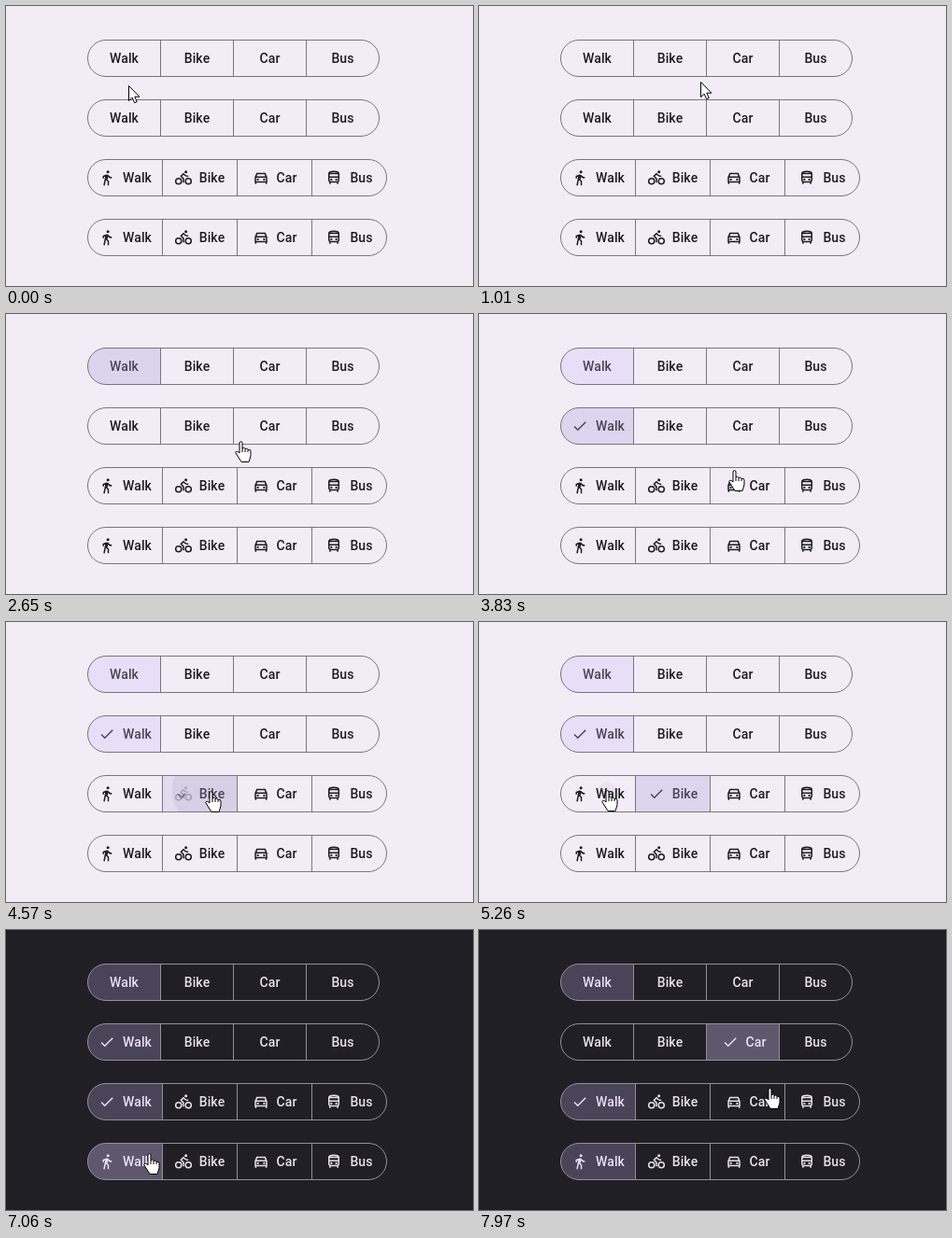
An HTML page with a canvas that plays this animation: 500 by 300 pixels, repeating every 8 s.

```html
<!DOCTYPE html>
<html lang="en">
<head>
<meta charset="utf-8">
<title>Segmented buttons</title>
<style>
html, body { margin: 0; width: 100%; height: 100%; overflow: hidden; background: #f2ecf7; }
canvas { display: block; width: 500px; height: 300px; }
</style>
</head>
<body>
<canvas id="stage"></canvas>
<script>
const LOOP = 8000, DARK_AT = 7000;
const canvas = document.getElementById('stage');
const ctx = canvas.getContext('2d');
const ratio = window.devicePixelRatio || 1;
canvas.width = 500 * ratio;
canvas.height = 300 * ratio;

const LIGHT = { bg: '#f2ecf7', line: '#79747e', text: '#1d1b20', on: '#4a4458', fill: '#e8def8', focus: '#ddd5ee', ripple: '29,27,32' };
const DARK = { bg: '#211f26', line: '#938f99', text: '#e6e0e9', on: '#e8def8', fill: '#4a4458', focus: '#5a5468', ripple: '230,224,233' };

const LABELS = ['Walk', 'Bike', 'Car', 'Bus'];
const LEFT = 87, HEIGHT = 40, ICON = 18, LEAD = 26;
const ROWS = [0, 1, 2, 3].map(i => ({
  y: 36 + 64 * i,
  cell: i < 2 ? 78 : 80,
  icon: i > 1,
  check: i === 1 || i === 2
}));

// Each click is reached through one point of a curve
const CLICKS = [
  { at: 1300, row: 0, col: 2, via: { t: 940, x: 215, y: 88 } },
  { at: 2290, row: 0, col: 0, via: { t: 1930, x: 205, y: 170 } },
  { at: 3250, row: 1, col: 0, via: { t: 2650, x: 251, y: 136 } },
  { at: 4480, row: 2, col: 1, via: { t: 4000, x: 306, y: 183 } },
  { at: 5320, row: 2, col: 0, via: { t: 4880, x: 298, y: 230 } },
  { at: 6100, row: 3, col: 3, via: { t: 5800, x: 270, y: 262 } },
  { at: 6790, row: 3, col: 0, via: { t: 6460, x: 194, y: 264 } },
  { at: 7680, row: 1, col: 2, via: { t: 7420, x: 220, y: 200 } }
];
const DWELL = 60;

// The pointer rests around each click, right of the cell centre
function keysFor({ at, row, col, via }) {
  const { y, cell } = ROWS[row];
  const rest = { x: LEFT + cell * (col + 0.5) + 10, y: y + 16, still: true };
  return [via, { ...rest, t: at - DWELL }, { ...rest, t: at + DWELL }];
}
const PATH = [
  { t: 0, x: 131, y: 85, still: true },
  { t: 630, x: 131, y: 85, still: true },
  ...CLICKS.flatMap(keysFor),
  { t: LOOP, x: 314, y: 176 }
];

function disc(path, x, y, r) {
  path.moveTo(x + r, y);
  path.arc(x, y, r, 0, Math.PI * 2);
}

// Icon on a 24 unit grid: stroked lines, rings and filled dots
function makeIcon(lines, dots, rings = []) {
  const stroke = new Path2D(lines), fill = new Path2D();
  dots.forEach(d => disc(fill, ...d));
  rings.forEach(r => disc(stroke, ...r));
  return { stroke, fill };
}
const ICONS = [
  makeIcon('M8 23L11 8.5L7 10V13M10.7 14L14 17V23M12 8.5L12.5 14M12.5 8Q15 12 19 12', [[13.5, 3.5, 2]]),
  makeIcon('M12 19V13.5L8.5 9.8L12 6.3L14 8.3Q16 10 19 10', [[15.5, 3.5, 2]], [[5, 17, 4.1], [19, 17, 4.1]]),
  makeIcon('M4 11.5L6.3 6H17.7L20 11.5V18H4ZM4 11.1H20M4.5 18V21M19.5 18V21', [[7.5, 14.5, 1.5], [16.5, 14.5, 1.5]]),
  makeIcon('M5 6Q5 3 12 3T19 6V15Q19 18 16 18H8Q5 18 5 15ZM5 6H19M5 11H19M6.5 18V21M17.5 18V21', [[8.5, 14.5, 1.5], [15.5, 14.5, 1.5]])
];
const CHECK = new Path2D('M4.1 12.7L9 17.6L20.3 6.3');
const ARROW = new Path2D('M.5 .5V16.6L4.2 13.2L6.6 18.7L9.2 17.6L6.8 12.2H11.9Z');
const HAND = new Path2D('M5 13V2C5 .2 8 .2 8 2V8Q10 6 11 8.5Q13 7 14 9.5Q17 8.5 17 11V16L15 22.5H7L1 13C0 11 3 10.5 5 13Z');
const KNUCKLES = new Path2D('M8 8V12M11 8.5V12M14 9.5V12');

const clamp = v => Math.max(0, Math.min(1, v));
const ease = v => { v = clamp(v); return v * v * (3 - 2 * v); };

function tangent(i, k) {
  if (PATH[i].still) return 0;
  const a = PATH[i - 1], b = PATH[Math.min(i + 1, PATH.length - 1)];
  return (b[k] - a[k]) / (b.t - a.t);
}

function pointer(t) {
  const i = PATH.findLastIndex((p, n) => p.t <= t && n < PATH.length - 1);
  const a = PATH[i], b = PATH[i + 1], h = b.t - a.t, u = (t - a.t) / h;
  return ['x', 'y'].map(k => a[k] + (b[k] - a[k]) * ease(u)
    + h * u * (1 - u) * ((1 - u) * tangent(i, k) - u * tangent(i + 1, k)));
}

// How far a cell is into its selected state, 0 to 1
function selection(t, row, col) {
  const [now, before] = CLICKS.filter(c => c.row === row && c.at <= t).reverse();
  if (!now) return 0;
  const p = ease((t - now.at) / 150);
  if (now.col === col) return p;
  return before && before.col === col ? 1 - p : 0;
}

function cellShape(x, y, w, col) {
  const r = HEIGHT / 2 - 0.5;
  const radii = col === 0 ? [r, 0, 0, r] : col === 3 ? [0, r, r, 0] : 0;
  ctx.beginPath();
  ctx.roundRect(x + 0.5, y + 0.5, w, HEIGHT - 1, radii);
}

function ripple(t, row, col, theme) {
  const hit = CLICKS.find(c => c.row === row && c.col === col && t > c.at - 80 && t < c.at + 370);
  if (!hit) return;
  const age = t - hit.at + 80;
  const alpha = 0.06 * clamp(age / 30) * clamp((450 - age) / 200);
  ctx.fillStyle = `rgba(${theme.ripple},${alpha})`;
  ctx.beginPath();
  disc(ctx, ...pointer(hit.at), 8 + 80 * ease(age / 400));
  ctx.fill();
}

function graphic(x, y, alpha, draw) {
  if (alpha <= 0) return;
  ctx.save();
  ctx.globalAlpha = alpha;
  ctx.translate(x, y);
  ctx.scale(ICON / 24, ICON / 24);
  ctx.lineWidth = 2;
  draw();
  ctx.restore();
}

function drawIcon({ stroke, fill }) {
  ctx.stroke(stroke);
  ctx.fill(fill);
}

function drawCheck(amount) {
  ctx.setLineDash([23 * amount, 40]);
  ctx.stroke(CHECK);
}

function drawCell(t, row, col, theme) {
  const { y, cell, icon, check } = ROWS[row];
  const x = LEFT + cell * col;
  const sel = selection(t, row, col);
  const last = CLICKS.findLast(c => c.at <= t);
  const focused = last && last.row === row && last.col === col;

  ctx.save();
  cellShape(x, y, cell, col);
  ctx.clip();
  if (sel > 0) {
    ctx.globalAlpha = sel;
    ctx.fillStyle = focused ? theme.focus : theme.fill;
    ctx.fillRect(x, y, cell + 1, HEIGHT);
    ctx.globalAlpha = 1;
  }
  ripple(t, row, col, theme);
  ctx.restore();

  const label = LABELS[col];
  const shift = icon ? LEAD / 2 : check ? (LEAD / 2 + 1) * sel : 0;
  const textX = x + 0.5 + (cell - ctx.measureText(label).width) / 2 + shift;
  const iconX = Math.round(textX - LEAD);
  const iconY = y + (HEIGHT - ICON) / 2;
  ctx.fillStyle = ctx.strokeStyle = sel > 0.5 ? theme.on : theme.text;
  ctx.fillText(label, textX, y + 25);
  if (icon) graphic(iconX, iconY, check ? 1 - sel : 1, () => drawIcon(ICONS[col]));
  if (check) graphic(iconX, iconY, sel, () => drawCheck(sel));
}

function drawRow(t, row, theme) {
  const { y, cell } = ROWS[row];
  LABELS.forEach((_, col) => drawCell(t, row, col, theme));
  ctx.strokeStyle = theme.line;
  ctx.lineWidth = 1;
  ctx.beginPath();
  ctx.roundRect(LEFT + 0.5, y + 0.5, cell * 4, HEIGHT - 1, HEIGHT / 2 - 0.5);
  for (let col = 1; col < 4; col++) {
    ctx.moveTo(LEFT + 0.5 + cell * col, y + 1);
    ctx.lineTo(LEFT + 0.5 + cell * col, y + HEIGHT - 1);
  }
  ctx.stroke();
}

function drawPointer(t) {
  const [x, y] = pointer(t).map(Math.round);
  const over = ROWS.some(r => y >= r.y && y < r.y + HEIGHT && x >= LEFT && x <= LEFT + r.cell * 4);
  const shape = over ? HAND : ARROW;
  ctx.save();
  ctx.translate(over ? x - 6 : x, y);
  ctx.fillStyle = '#fff';
  ctx.strokeStyle = '#000';
  ctx.lineWidth = 1;
  ctx.fill(shape);
  ctx.stroke(shape);
  if (over) ctx.stroke(KNUCKLES);
  ctx.restore();
}

function render(t) {
  const theme = t >= DARK_AT ? DARK : LIGHT;
  ctx.setTransform(ratio, 0, 0, ratio, 0, 0);
  ctx.fillStyle = theme.bg;
  ctx.fillRect(0, 0, 500, 300);
  ctx.font = '450 14px Roboto, sans-serif';
  ctx.letterSpacing = '0.1px';
  ROWS.forEach((_, row) => drawRow(t, row, theme));
  drawPointer(t);
}

const begin = performance.now();
function tick() {
  render((performance.now() - begin) % LOOP);
  requestAnimationFrame(tick);
}
tick();
</script>
</body>
</html>
```
